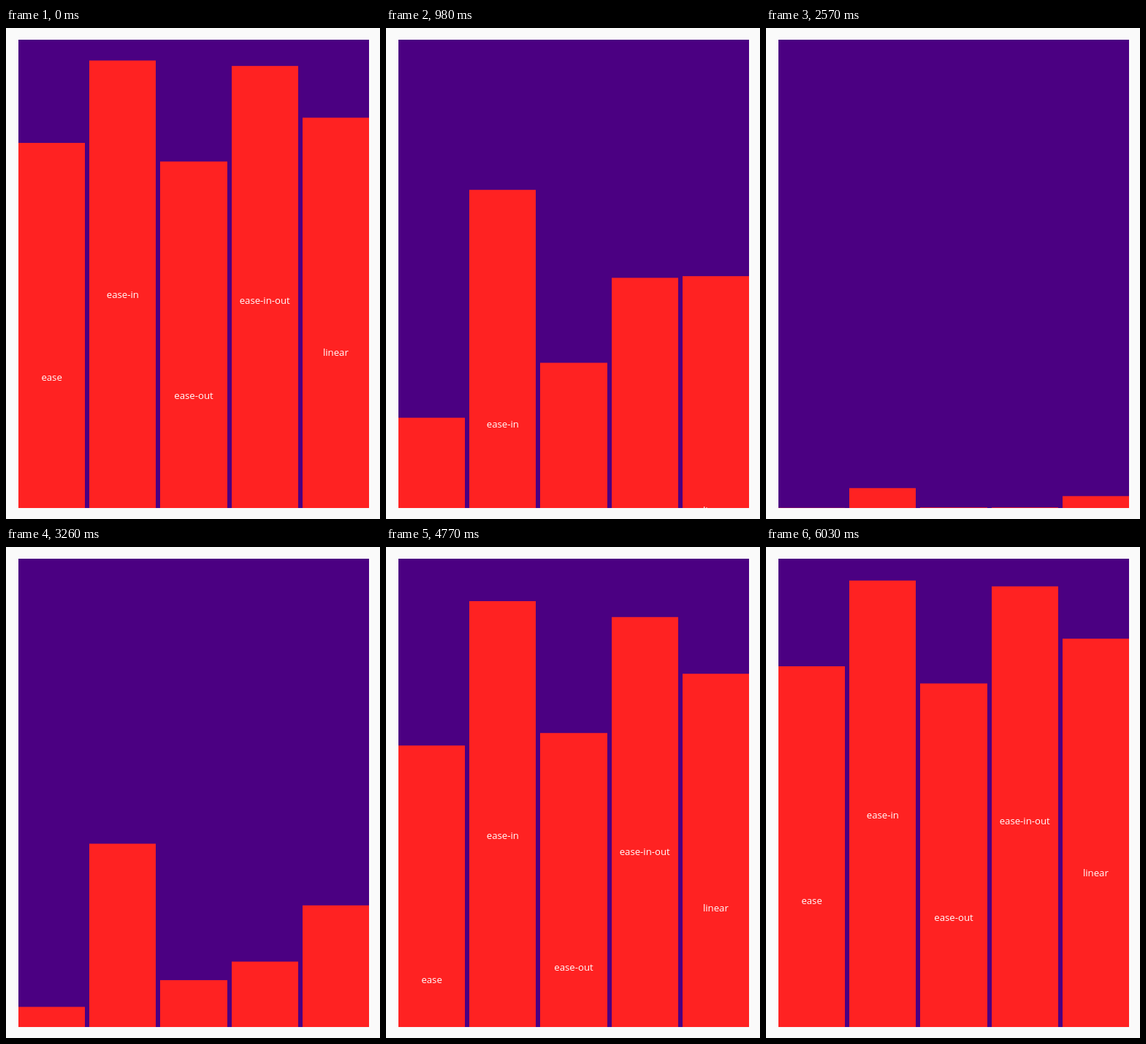
Write an HTML page that moves like this. It is 512 by 671 pixels and loops after 6.12 s.

```html
<!DOCTYPE html>
<html lang="en">
<head>
<meta charset="utf-8">
<title>Easing bars</title>
<style>
  html, body { margin: 0; width: 100%; height: 100%; overflow: hidden; background: #fafafa; }
  svg { display: block; width: 512px; height: 671px; }
  text { font: 500 13.2px "Open Sans", "Noto Sans", sans-serif; fill: #fff; text-anchor: middle; }
</style>
</head>
<body>
<svg viewBox="0 0 512 671">
  <clipPath id="box"><rect x="17" y="16" width="480" height="640"/></clipPath>
  <rect x="17" y="16" width="480" height="640" fill="#4b0082"/>
  <g id="bars" clip-path="url(#box)"></g>
</svg>
<script>
const LOOP = 6120;
const BOX = { x: 17, y: 16, width: 480, height: 640 };
const BAR_WIDTH = BOX.width * 0.19;
const PITCH = (BOX.width - BAR_WIDTH) / 4;

// The picture moves in even steps; the first one is shortened by LEAD.
const STEP_MS = 78.6, LEAD = 46, LAST_STEP = 77;

// Progress counts passes: 0..1 falls, 1..2 rises, and so on.
const START = 0.1665, STEP = 0.02603;

const EASINGS = {
  "ease": bezier(0.25, 0.1, 0.25, 1),
  "ease-in": bezier(0.42, 0, 1, 1),
  "ease-out": bezier(0, 0, 0.58, 1),
  "ease-in-out": bezier(0.42, 0, 0.58, 1),
  "linear": x => x
};

function bezier(x1, y1, x2, y2) {
  const at = (a, b, t) => 3 * a * t * (1 - t) ** 2 + 3 * b * t * t * (1 - t) + t ** 3;
  return x => {
    let low = 0, high = 1;
    for (let i = 0; i < 30; i++) {
      const mid = (low + high) / 2;
      if (at(x1, x2, mid) < x) low = mid; else high = mid;
    }
    return at(y1, y2, low);
  };
}

function add(parent, tag, attributes = {}) {
  const node = document.createElementNS("http://www.w3.org/2000/svg", tag);
  for (const name in attributes) node.setAttribute(name, attributes[name]);
  return parent.appendChild(node);
}

const bars = Object.entries(EASINGS).map(([label, ease], i) => {
  const group = add(document.getElementById("bars"), "g");
  const left = BOX.x + i * PITCH;
  const x = Math.round(left);
  const width = Math.round(left + BAR_WIDTH) - x;
  add(group, "rect", { x, y: 0, width, height: BOX.height, fill: "#ff2222" });
  add(group, "text", { x: left + BAR_WIDTH / 2, y: 325 }).textContent = label;
  return { group, ease };
});

function draw(ms) {
  const step = Math.min(LAST_STEP, Math.floor((ms + LEAD) / STEP_MS));
  const phase = (START + STEP * step) % 2;
  const progress = phase > 1 ? 2 - phase : phase;
  for (const { group, ease } of bars) {
    const y = BOX.y + BOX.height * ease(progress);
    group.setAttribute("transform", `translate(0 ${y.toFixed(2)})`);
  }
}

function tick() {
  draw(performance.now() % LOOP);
  requestAnimationFrame(tick);
}
tick();
</script>
</body>
</html>
```
